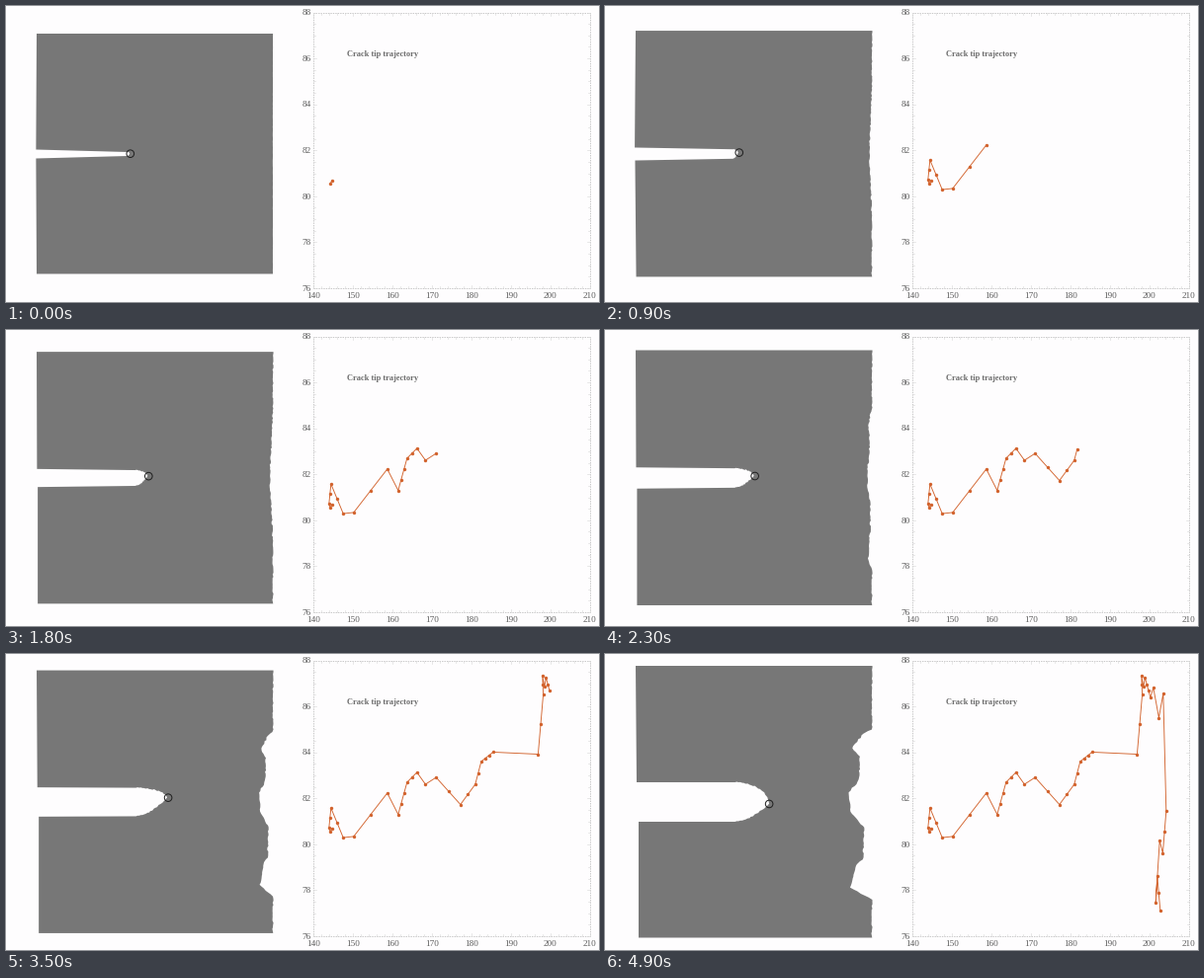
A matplotlib script for the animation above (5 s loop, 600x300 px).

```python
import numpy as np
import matplotlib.pyplot as plt
from matplotlib.animation import FuncAnimation
from matplotlib.patches import Circle, Polygon

W, H, DPI = 600, 300, 100
FRAMES, INTERVAL = 50, 100
PX = 72 / DPI  # one pixel in points
ORANGE, PLATE, INK = "#d2622c", "#777777", "#5a5a5a"
MIDDLE = 150  # height of the crack plane

# Turning points of the crack tip; a third value is the number of steps there
TURNS = [
    (144.75, 80.68), (144.3, 80.55), (144, 80.72), (144.5, 81.58, 2),
    (147.6, 80.29, 2), (150.25, 80.34), (158.75, 82.23, 2), (161.5, 81.3),
    (163.75, 82.7, 3), (166.25, 83.13, 2), (168.4, 82.61), (171.1, 82.91),
    (177.25, 81.73, 2), (181, 82.61, 2), (182.5, 83.6, 2), (185.5, 84.01, 3),
    (196.9, 83.92), (198.2, 86.52, 2), (198, 87.34, 2), (198.5, 86.86),
    (198.9, 87.25), (200.25, 86.39, 3), (201, 86.82), (202.4, 85.51),
    (203.5, 86.56), (204.25, 81.45), (203.4, 79.61, 2), (202.6, 80.16),
    (201.6, 77.46), (202, 78.62), (202.75, 77.12, 2),
]

# Final depth of the three dents in the right edge, along its height
DENT_Y = np.array([76, 80, 95, 104, 128, 141, 160, 176, 208, 214, 236, 249])
DENT_DEPTH = [0, 8, 20, 12, 13, 24, 21, 8, 9, 16, 22, 0]


def expand(turns):
    points = [turns[0]]
    for x, y, *steps in turns[1:]:
        count = steps[0] if steps else 1
        points += list(np.linspace(points[-1], (x, y), count + 1)[1:])
    return np.array(points)


TRAJECTORY = expand(TURNS)


def shown_points(frame):
    count = np.interp(frame, [0, 5, 13, 23, 35, 43, 49],
                      [2, 5, 14, 23, 36, 43, 48])
    return TRAJECTORY[:int(round(count))]


def tip_position(point):
    return 126 + .69 * (point[0] - 144.6), MIDDLE - .66 * (point[1] - 80.1)


def roughen(x, y, amount):
    noise = np.random.default_rng(4).uniform(-amount, amount, (len(x), 2))
    return np.column_stack([x, y]) + noise


def right_edge(frame, top, bottom, rough):
    y = np.linspace(top, bottom, 130)
    spread = .9 + .1 * frame / (FRAMES - 1)
    growth = np.clip((frame - 20) / 29, 0, 1) ** .8
    dents = growth * np.interp(y, MIDDLE + (DENT_Y - MIDDLE) * spread, DENT_DEPTH,
                               left=0, right=0)
    bow = 4 * np.exp(-((frame - 14) / 7) ** 2 - ((y - MIDDLE) / 40) ** 2)
    edge = roughen(270 - dents - bow, y, rough)
    edge[[0, -1], 1] = top, bottom
    return edge


def plate_outline(frame):
    t = frame / (FRAMES - 1)
    rough = .6 * min(1, .15 + frame / 12)
    top, bottom = 28 - 16 * t, 271.5 + 16 * t
    bulge = 3 * np.exp(-((frame - 5) / 4) ** 2)
    mouth = 4.5 + 15.5 * t ** 1.2
    neck = 2 + 18 * t ** 1.1
    neck_x = 131 - 8 * np.exp(-frame / 6)
    points = shown_points(frame)
    tip_x, tip_y = tip_position((points[:, 0].max(), points[-1, 1]))

    # The upper lip is a quarter ellipse, the lower one a power curve
    u = np.linspace(0, 1, 20)
    x = neck_x + u * (tip_x - 1 - neck_x)
    y_upper, y_lower = MIDDLE - neck, MIDDLE + neck
    upper = roughen(x, y_upper + (1 - np.sqrt(1 - u ** 2)) * (tip_y - y_upper), rough)
    lower = roughen(x, y_lower + u ** 1.7 * (tip_y - y_lower), rough)
    return np.vstack([
        [(31, top)],
        right_edge(frame, top, bottom, rough),
        [(31 + 3 * t, bottom), (31 + 3 * t - bulge, MIDDLE + mouth)],
        lower,
        upper[::-1],
        [(31 + t - bulge, MIDDLE - mouth)],
    ])


def chart_x(value):
    return 310.8 + (value - 140) * 4


def chart_y(value):
    return 286 - (value - 76) * 23.29


fig = plt.figure(figsize=(W / DPI, H / DPI), dpi=DPI, facecolor="#fefdfe")
ax = fig.add_axes([0, 0, 1, 1])
ax.set(xlim=(0, W), ylim=(H, 0))
ax.axis("off")


def draw_chart():
    x0, x1, y0, y1 = chart_x(140), chart_x(210), chart_y(76), chart_y(88)
    frame_style = dict(color="#b4b4b4", lw=.7 * PX, ls=(0, (2, 1.5)))
    tick_style = dict(color="#d8d8d8", lw=.6 * PX)
    font = dict(family="Liberation Serif", fontsize=9.2 * PX, color=INK)
    ax.plot([x0, x1, x1, x0, x0], [y0, y0, y1, y1, y0], **frame_style)
    for value in range(140, 211, 2):
        x, size = chart_x(value), 3 if value % 10 == 0 else 2
        ax.plot([x, x], [y0, y0 - size], **tick_style)
        ax.plot([x, x], [y1, y1 + size], **tick_style)
        if value % 10 == 0:
            ax.text(x, 295.5, str(value), ha="center", va="baseline", **font)
    for value in np.arange(76, 88.1, .5):
        y, size = chart_y(value), 3 if value % 2 == 0 else 2
        ax.plot([x0, x0 + size], [y, y], **tick_style)
        ax.plot([x1, x1 - size], [y, y], **tick_style)
        if value % 2 == 0:
            ax.text(309, y + 2.8, f"{value:.0f}", ha="right", va="baseline", **font)
    ax.text(345, 51, "Crack tip trajectory", family="Liberation Serif",
            weight="bold", fontsize=8.4 * PX, color="#6c6c6c", va="baseline")


draw_chart()
plate = ax.add_patch(Polygon(plate_outline(0), closed=True, fc=PLATE, ec="none"))
tip = ax.add_patch(Circle(tip_position(TRAJECTORY[1]), 3.8, fill=False,
                          ec="#202020", lw=PX))
trace, = ax.plot([], [], "-o", color=ORANGE, lw=.9 * PX, ms=3.4 * PX, mew=0,
                 snap=False)


def update(frame):
    points = shown_points(frame)
    plate.set_xy(plate_outline(frame))
    tip.center = tip_position(points[-1])
    trace.set_data(chart_x(points[:, 0]), chart_y(points[:, 1]))
    return plate, tip, trace


anim = FuncAnimation(fig, update, frames=FRAMES, interval=INTERVAL,
                     repeat=True, repeat_delay=0)
plt.show()
```
